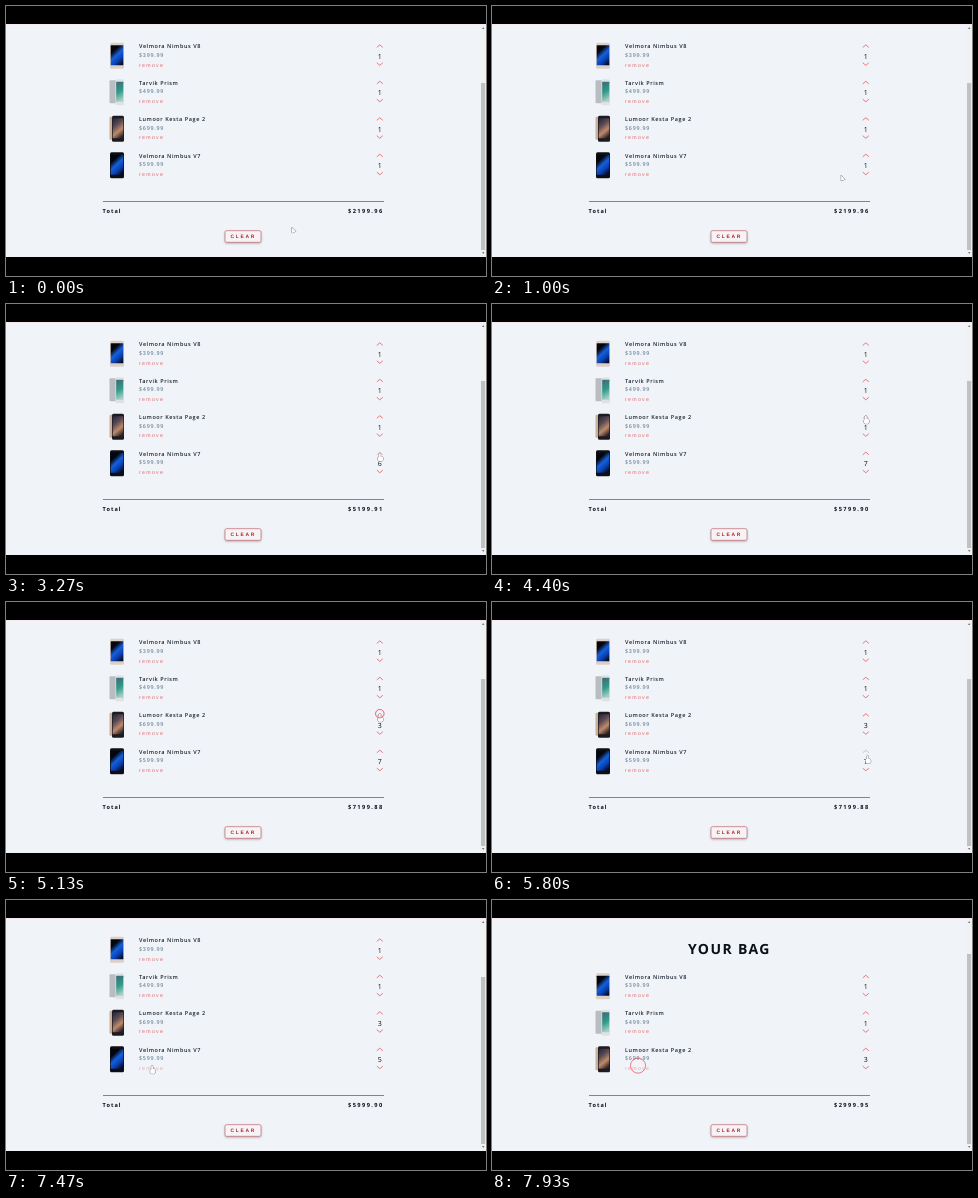
Recreate the animation shown at these times as an HTML page with a canvas. Size 480x270 px, loop 8000 ms.

```html
<!DOCTYPE html>
<html lang="en">
<head>
<meta charset="utf-8">
<title>Your bag</title>
<style>
html, body { margin: 0; width: 100%; height: 100%; overflow: hidden; background: #000; }
canvas { display: block; width: 480px; height: 270px; }
</style>
</head>
<body>
<canvas id="stage"></canvas>
<script>
const LOOP = 8000, RIPPLE = 190, REMOVED_AT = 7780;
const FIRST_ROW = 36.3, ROW = 36.45, BUTTON_X = 373.8;
const SANS = '"Open Sans", sans-serif', ARIAL = '"Liberation Sans", Arial, sans-serif';
const INK = '#18222e', BLACK = '#0b1017', SLATE = '#6c869c', RED = '#e6676c', PALE = '#dcb2b6';

const canvas = document.getElementById('stage');
const ctx = canvas.getContext('2d');
const dpr = window.devicePixelRatio || 1;
canvas.width = 480 * dpr;
canvas.height = 270 * dpr;

const BLUE_WAVE = ['#04060f', '#04060f', '#1560dc', '#0b3fae', '#060c22'];
const products = [
  { name: 'Velmora Nimbus V8', cents: 39999, front: 104, frame: '#dccfc6', screen: BLUE_WAVE },
  { name: 'Tarvik Prism', cents: 49999, front: 109.5, frame: '#dfe2e5', back: '#b9bdc2', screen: ['#3d6f74', '#2f9a8a', '#a9cfc4'] },
  { name: 'Lumoor Kesta Page 2', cents: 69999, front: 106, frame: '#1d1a20', back: '#c9b09a', screen: ['#2c2a38', '#5b4a55', '#c08a68', '#2b2228'] },
  { name: 'Velmora Nimbus V7', cents: 59999, front: 104, frame: '#0d0f15', screen: BLUE_WAVE }
];

const rowTop = i => FIRST_ROW + i * ROW;

// Evenly spaced clicks on one quantity button.
const run = (start, every, count, item, step) =>
  Array.from({ length: count }, (_, i) => ({ at: start + i * every, item, step }));

const clicks = [
  ...run(1960, 280, 5, 3, 1),
  ...run(3470, 0, 1, 3, 1),
  ...run(4700, 370, 2, 2, 1),
  ...run(6270, 350, 2, 3, -1),
  { at: REMOVED_AT, item: 3, step: 0 }
];

const home = { x: 286, y: 221.5 };
const moves = [
  { from: 70, to: 1500, x: BUTTON_X, y: rowTop(3) + 3.5 },
  { from: 3700, to: 4000, x: BUTTON_X, y: rowTop(2) + 2.5 },
  { from: 5400, to: 5800, x: 375.5, y: rowTop(3) + 7.8 },
  { from: 6000, to: 6070, x: BUTTON_X, y: rowTop(3) + 21 },
  { from: 6880, to: 7460, x: 146, y: rowTop(3) + 20 }
];

function cursorAt(t) {
  let { x, y } = home;
  for (const m of moves) {
    const p = Math.min(1, Math.max(0, (t - m.from) / (m.to - m.from)));
    const ease = p * p * (3 - 2 * p);
    x += (m.x - x) * ease;
    y += (m.y - y) * ease;
  }
  return { x, y };
}

function box(x, y, w, h, fill, radius = 0) {
  ctx.beginPath();
  ctx.roundRect(x, y, w, h, radius);
  ctx.fillStyle = fill;
  ctx.fill();
}

function stroke(color, width) {
  ctx.strokeStyle = color;
  ctx.lineWidth = width;
  ctx.stroke();
}

function text(str, x, y, size, weight, color, spacing, family = SANS, align = 'left') {
  ctx.font = `${weight} ${size}px ${family}`;
  ctx.letterSpacing = spacing + 'px';
  ctx.textAlign = align;
  ctx.fillStyle = color;
  ctx.fillText(str, x, y);
}

const money = cents => '$' + (cents / 100).toFixed(2);

function drawPhone({ front, frame, back, screen }) {
  const width = 118 - front;
  if (back) box(103.5, 1.5, 8, 23, back, 1);
  box(front, 0.5, width, 26, frame, 1.5);
  const glow = ctx.createLinearGradient(front, 5, front + width, 20);
  screen.forEach((c, i) => glow.addColorStop(i / (screen.length - 1), c));
  box(front + 0.7, 3, width - 1.4, 20, glow, 0.4);
}

function chevron(y, dir, color) {
  ctx.beginPath();
  ctx.moveTo(BUTTON_X - 3, y + 1.3 * dir);
  ctx.lineTo(BUTTON_X, y - 1.3 * dir);
  ctx.lineTo(BUTTON_X + 3, y + 1.3 * dir);
  stroke(color, 0.9);
}

// Returns true when the cursor is over one of the row's buttons.
function drawRow(product, qty, top, cursor) {
  const over = (x, y, reach) => Math.abs(cursor.x - x) < reach && Math.abs(cursor.y - top - y) < 5;
  const up = over(BUTTON_X, 4, 5), down = over(BUTTON_X, 21.8, 5), remove = over(145, 21.5, 13);
  ctx.save();
  ctx.translate(0, top);
  drawPhone(product);
  text(product.name, 133, 6.1, 5.5, 600, INK, 0.57);
  text(money(product.cents), 133, 14.6, 5.4, 600, SLATE, 0.75);
  text('remove', 133, 24.2, 5.2, 400, remove ? '#e9a5a9' : RED, 1.32, ARIAL);
  chevron(3.8, 1, up ? PALE : RED);
  text(String(qty), BUTTON_X, 16.5, 7, 400, BLACK, 0, SANS, 'center');
  chevron(21.8, -1, down ? PALE : RED);
  ctx.restore();
  return up || down || remove;
}

function drawFooter(total) {
  box(97, 195, 281, 1, '#6f8aa0');
  text('Total', 96.6, 207, 5.6, 700, BLACK, 1.02);
  text(money(total), 342, 207, 5.7, 700, BLACK, 1.42);

  ctx.save();
  ctx.shadowColor = 'rgba(60, 40, 50, .45)';
  ctx.shadowBlur = 2.5 * dpr;
  ctx.shadowOffsetY = dpr;
  box(219, 224.7, 36, 11.6, '#f5f3f6', 1.6);
  ctx.restore();
  stroke('#c87a80', 0.8);
  text('CLEAR', 224.6, 232.3, 4.9, 700, '#ad1f2a', 1.7, ARIAL);
}

function drawScrollbar(thumbTop) {
  box(474.6, 18, 5.4, 233, '#f1f1f1');
  box(475, thumbTop, 4.2, 244 - thumbTop, '#c1c1c1');
  for (const [y, dir] of [[22, 1], [247, -1]]) {
    ctx.beginPath();
    ctx.moveTo(476, y + dir);
    ctx.lineTo(477.2, y - dir);
    ctx.lineTo(478.4, y + dir);
    ctx.fillStyle = '#777';
    ctx.fill();
  }
}

function drawCursor({ x, y }, hand) {
  ctx.beginPath();
  if (hand) {
    ctx.roundRect(x - 0.7, y, 1.6, 6, 0.8);
    ctx.roundRect(x - 1.8, y + 3.4, 5, 4.6, 1.4);
  } else {
    ctx.moveTo(x, y);
    ctx.lineTo(x, y + 5.4);
    ctx.lineTo(x + 3.7, y + 3.9);
    ctx.closePath();
  }
  stroke('#77797e', 1);
  ctx.fillStyle = '#fff';
  ctx.fill();
}

function drawRipple({ x, y }, age) {
  const p = age / RIPPLE;
  ctx.globalAlpha = 1 - 0.3 * p;
  ctx.beginPath();
  ctx.arc(x, y, 2 + 7 * p, 0, Math.PI * 2);
  stroke('#e0444e', 0.9);
  ctx.globalAlpha = 1;
}

function draw(t) {
  const removed = t >= REMOVED_AT;
  const past = clicks.filter(c => c.at <= t);
  const shown = removed ? products.slice(0, -1) : products;
  const qty = shown.map((_, i) => past.reduce((n, c) => c.item === i ? n + c.step : n, 1));
  const total = shown.reduce((sum, p, i) => sum + p.cents * qty[i], 0);
  const cursor = cursorAt(t);
  const shift = removed ? ROW : 0;

  ctx.setTransform(dpr, 0, 0, dpr, 0, 0);
  ctx.textRendering = 'geometricPrecision';
  box(0, 0, 480, 270, '#f0f4f8');
  text('YOUR BAG', 196, 17.6 + shift, 14, 700, BLACK, 1.4);
  const hovers = shown.map((p, i) => drawRow(p, qty[i], rowTop(i) + shift, cursor));
  drawFooter(total);
  drawScrollbar(removed ? 54 : 77);
  if (!removed) drawCursor(cursor, hovers.includes(true));
  const age = past.length ? t - past[past.length - 1].at : RIPPLE;
  if (age < RIPPLE) drawRipple(cursor, age);

  box(0, 18, 480, 1, '#f7e8f0');
  box(0, 0, 480, 18, '#000');
  box(0, 251, 480, 19, '#000');
}

const begin = performance.now();
function tick() {
  draw((performance.now() - begin) % LOOP);
  requestAnimationFrame(tick);
}
tick();
</script>
</body>
</html>
```
